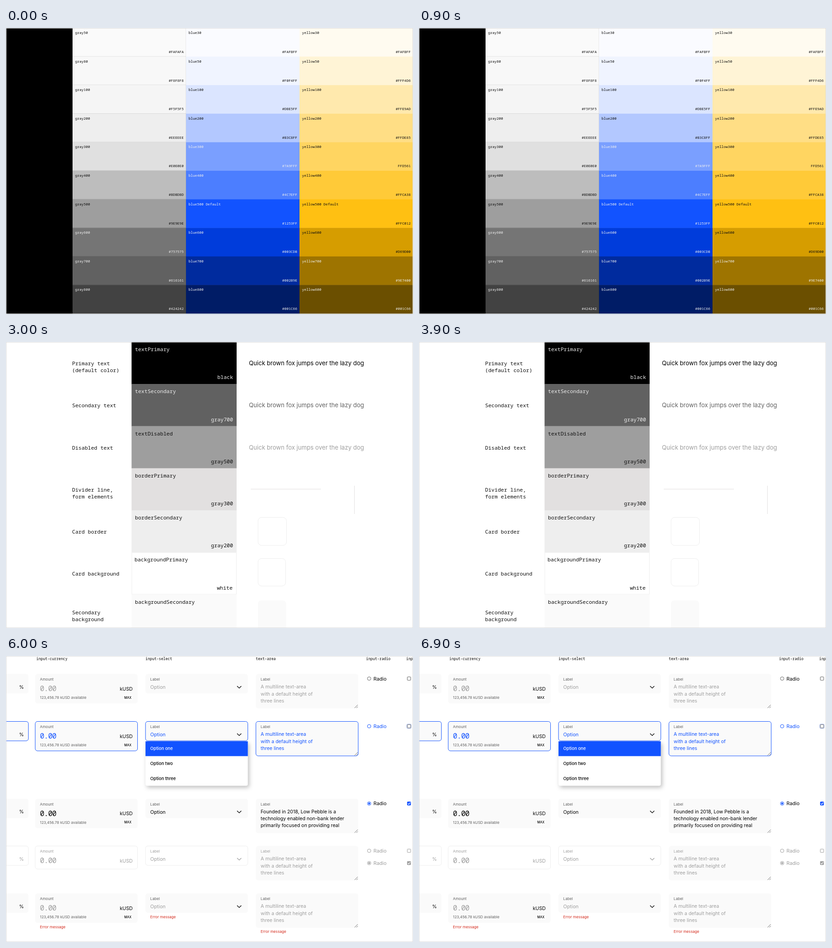
Write an HTML page that moves like this. It is 893x627 px and loops after 7.5 s.

```html
<!DOCTYPE html>
<html lang="en">
<head>
<meta charset="utf-8">
<title>Colour system</title>
<style>
html, body { margin: 0; width: 100%; height: 100%; overflow: hidden; }
svg { display: block; width: 893px; height: 627px; }
text { font-family: Inter, sans-serif; white-space: pre; }
.mono { font-family: "Noto Sans Mono", "DejaVu Sans Mono", monospace; }
</style>
</head>
<body>
<svg id="stage" viewBox="0 0 893 627"></svg>
<script>
const SLIDE_MS = 1500;
const BLUE = '#1253FF';

const rect = (x, y, w, h, fill, attrs = '') =>
  `<rect x="${x}" y="${y}" width="${w}" height="${h}" fill="${fill}" ${attrs}/>`;
const box = (x, y, w, h, r, fill, stroke = 'none') =>
  rect(x, y, w, h, fill, `rx="${r}" stroke="${stroke}"`);
const path = (d, stroke, width = 1) =>
  `<path d="${d}" fill="none" stroke="${stroke}" stroke-width="${width}"/>`;
const text = (x, y, size, fill, str, attrs = '') =>
  `<text x="${x}" y="${y}" font-size="${size}" fill="${fill}" ${attrs}>${str}</text>`;
const mono = (x, y, size, fill, str, attrs = '') =>
  text(x, y, size, fill, str, `class="mono" ${attrs}`);
const END = 'text-anchor="end"';

// Palette: [name, shades, swatch colours, first row with light text, label overrides]
const palette = [
  ['gray', '50 80 100 200 300 400 500 600 700 800',
    'FAFAFA F8F8F8 F5F5F5 EEEEEE E0E0E0 BDBDBD 9E9E9E 757575 616161 424242', 7, {}],
  ['blue', '30 50 100 200 300 400 500 600 700 800',
    'FAFBFF F0F4FF DBE5FF B3C8FF 7A9FFF 4C7EFF 1253FF 003CDB 002B9E 001C66', 4, {}],
  ['yellow', '30 50 100 200 300 400 500 600 700 800',
    'FFFBF0 FFF4D6 FFE9AD FFDE85 FFD561 FFCA38 FFC012 D69D00 9E7400 6B4F00', 8,
    { 0: '#FAFBFF', 4: 'FFD561', 9: '#001C66' }],
];

function paletteSlide() {
  const rowH = 62.6;
  let out = rect(0, 0, 146, 627, '#000');
  palette.forEach(([name, shades, colours, lightFrom, labels], c) => {
    const x = 146 + c * 249;
    const hexes = colours.split(' ');
    shades.split(' ').forEach((shade, r) => {
      const y = r * rowH;
      const ink = r < lightFrom ? '#111' : '#eee';
      const suffix = c && shade === '500' ? ' Default' : '';
      out += rect(x, y, 249, rowH + 0.5, '#' + hexes[r]);
      if (!c) out += path(`M${x} ${y + rowH - 0.3}h249v${-rowH}`, 'rgba(0,0,0,.13)');
      out += mono(x + 5.5, y + 13, 7.85, ink, name + shade + suffix);
      out += mono(x + 244, y + 55, 7.85, ink, labels[r] || '#' + hexes[r], END);
    });
  });
  return out;
}

const roles = [
  ['textPrimary', 'Primary text', '(default color)'],
  ['textSecondary', 'Secondary text'],
  ['textDisabled', 'Disabled text'],
  ['borderPrimary', 'Divider line,', 'form elements'],
  ['borderSecondary', 'Card border'],
  ['backgroundPrimary', 'Card background'],
  ['backgroundSecondary', 'Secondary', 'background'],
];

function rolesSlide(t) {
  const rowH = 92.25;
  let out = rect(0, 0, 893, 627, t.page);
  roles.forEach(([role, ...notes], i) => {
    const y = i * rowH;
    const nudge = i === 5 ? t.nudge : 0;
    const ink = t.inks[i];
    notes.forEach((note, n) =>
      out += mono(t.noteX, y + (i === 6 ? 43.5 : 51) + n * 15, 11.53, t.ink, note));
    out += rect(t.x, y, 230.5, rowH + 0.3, t.fills[i]);
    if (i === 5) out += box(t.x + 0.5, y + 0.5, 229.5, rowH - 1, 0, t.page, t.fills[4]);
    out += mono(t.x + 7.5 - nudge, y + 20, 11.53, ink, role);
    if (t.values[i]) out += mono(t.x + 222.7 - nudge, y + 81.3, 11.53, ink, t.values[i], END);
    if (i < 3) {
      out += text(t.sampleX, y + 51, 13.1, t.fills[i], 'Quick brown fox jumps over the lazy dog');
    }
  });
  const [line, card] = [t.fills[3], t.fills[4]];
  out += path(`M${t.lineX} 322.5h154M${t.barX} 315v62`, line);
  out += box(t.cardX + 0.5, 384.5, t.cardW, 61.5, 8, 'none', card);
  out += box(t.cardX + 0.5, 474.5, 60.5, 60.5, 8, t.page, card);
  return out + box(t.cardX + 0.5, 566.5, 61.5, 70, 7, t.fills[6]);
}

const darkRoles = {
  page: '#000', ink: '#eee', x: 277.7, noteX: 147, sampleX: 539, nudge: 0,
  lineX: 539, barX: 769.5, cardX: 538.5, cardW: 61.5,
  fills: ['#fff', '#9E9E9E', '#757575', '#616161', '#424242', '#000', '#212121'],
  inks: ['#111', '#111', '#111', '#eee', '#eee', '#eee', '#eee'],
  values: ['white', 'gray500', 'gray600', 'gray700', 'gray800', 'black'],
};
const lightRoles = {
  page: '#fff', ink: '#111', x: 275.5, noteX: 145, sampleX: 533, nudge: 1,
  lineX: 537, barX: 764.5, cardX: 552.5, cardW: 62.5,
  fills: ['#000', '#616161', '#9E9E9E', '#E2E0E0', '#EEEEEE', '#fff', '#FAFAFA'],
  inks: ['#eee', '#eee', '#111', '#111', '#111', '#111', '#111'],
  values: ['black', 'gray700', 'gray500', 'gray300', 'gray200', 'white'],
};

const rowTops = [39, 143, 312.5, 416, 520];
const FOCUS = 1, FILLED = 2, DISABLED = 3, ERROR = 4;
const sampleLines = ['A multiline text-area', 'with a default height of', 'three lines'];

function radio(t, x, y, colour, ink, on) {
  return `<circle cx="${x}" cy="${y}" r="3.8" fill="none" stroke="${colour}"/>` +
    (on ? `<circle cx="${x}" cy="${y}" r="2.1" fill="${colour}"/>` : '') +
    text(x + 9.5, y + 4, 10.8, ink, 'Radio');
}

function checkbox(t, y, colour, on) {
  const x = t.checkX;
  return box(x - 3.7, y - 3.7, 7.4, 7.4, 1, on ? colour : 'none', colour) +
    (on ? path(`M${x - 2.5} ${y}l2 2 3.2-4`, t.page, 1.2) : '');
}

function formsSlide(t) {
  const [cx, sx, ax] = t.cols;
  let out = rect(0, 0, 893, 627, t.page);
  ['input-currency', 'input-select', 'text-area', 'input-radio', 'input-checkbox'].forEach((h, i) =>
    out += mono(t.heads[i], 9, 8.15, t.ink, h, 'font-weight="500"'));

  rowTops.forEach((y, row) => {
    const off = row === DISABLED;
    const stroke = row === FOCUS ? t.focus : off ? t.outline : 'none';
    const value = [t.hint, t.value, t.ink, t.off, t.hint][row];
    const label = off ? t.offLabel : t.label;
    const strong = off ? t.off : t.ink;
    const panel = (x, w, h, fill = off ? t.page : t.panel, line = stroke) =>
      box(x + 0.5, y + 0.5, w - 1, h - 1, 5, fill, line);
    const small = (x, dy, colour, str) => text(x, y + dy, 8.15, colour, str);

    out += panel(-20, t.percentW + 20, 43.5);
    out += text(t.percentX, y + 32.5, 10.6, strong, '%', 'text-anchor="middle"');

    out += panel(cx, 225.5, off ? 51.5 : 65.5);
    out += small(cx + 11, 15, label, 'Amount');
    out += mono(cx + 11, y + 38.2, 16, value, '0.00', 'letter-spacing="-.7"');
    out += text(cx + 214.3, y + 36.5, 10.6, strong, 'kUSD', END);
    if (!off) {
      out += small(cx + 11, 55.2, label, '123,456.78 kUSD available');
      out += box(cx + 193.5, y + 46, 20.5, 12, 3, t.page);
      out += text(cx + 203.8, y + 54.6, 6.9, t.ink, 'MAX', 'text-anchor="middle" font-weight="500"');
    }

    out += panel(sx, 225.5, 43.5);
    out += small(sx + 11, 15, label, 'Label');
    out += text(sx + 11, y + 33, 10.7, value, 'Option');
    out += path(`M${sx + 201.5} ${y + 27}l4.6 4.4 4.6-4.4`, strong, 1.3);

    const lines = row === FILLED ? t.filledLines : sampleLines;
    const areaInk = row === ERROR ? t.errorArea : value;
    if (off && t.solidArea) out += panel(ax, 225.5, 76.5, t.panel, 'none');
    else out += panel(ax, 225.5, 76.5);
    out += small(ax + 11, 15, label, 'Label');
    lines.forEach((line, i) =>
      out += text(ax + 11, y + 32.4 + i * 15.1, 10.5, areaInk, line));
    out += path(`M${ax + 217} ${y + 75}l7-7M${ax + 221} ${y + 75}l3-3`, t.label, 0.9);

    if (row === ERROR) {
      [[cx, 76.5], [sx, 55], [ax, t.areaErrorY]].forEach(([x, dy]) =>
        out += small(x + 11, dy, t.error, 'Error message'));
    }
  });

  const menu = rect(sx + 0.5, 187, 224.5, 97.5, t.page, `rx="4" style="filter:drop-shadow(${t.shadow})"`);
  out += menu + rect(sx + 0.5, 187, 224.5, 32.5, BLUE);
  ['one', 'two', 'three'].forEach((n, i) =>
    out += text(sx + 11, 206.4 + i * 32.7, 9.45, i ? t.ink : t.page, 'Option ' + n, 'font-weight="500"'));

  const rx = t.radioX;
  out += radio(t, rx + t.radioShift, 49.5, t.label, t.ink);
  out += radio(t, rx, 154, t.focus, t.value);
  out += radio(t, rx, t.checkedY, BLUE, t.ink, true);
  out += radio(t, rx, 427, t.off, t.off) + radio(t, rx, 454, t.off, t.off, true);

  out += box(t.checkX - 4.8, 149.2, 9.6, 9.6, 2, 'none', t.ring);
  out += checkbox(t, 49.5, t.label) + checkbox(t, 154, t.checkFocus);
  out += checkbox(t, t.checkedY, BLUE, true);
  return out + checkbox(t, 427, t.off) + checkbox(t, 454, t.off, true);
}

const darkForms = {
  page: '#000', panel: '#181818', ink: '#fff', hint: '#6b6b6b', label: '#9E9E9E',
  off: '#6b6b6b', offLabel: '#8a8a8a', outline: '#2c2c2c', focus: BLUE, value: '#4C7EFF',
  error: '#E0402A', errorArea: '#fff', areaErrorY: 87.5, solidArea: false,
  cols: [65, 309.3, 553.7], heads: [65, 307, 551, 796, 879],
  percentW: 48.5, percentX: 33, radioX: 802, radioShift: 3, checkX: 885.3, checkedY: 313.7,
  ring: '#0d349c', checkFocus: '#4C7EFF', filledLines: sampleLines,
  shadow: '3px 4px 4px rgba(255,255,255,.5)',
};
const lightForms = {
  page: '#fff', panel: '#FAFAFA', ink: '#000', hint: '#9E9E9E', label: '#616161',
  off: '#9E9E9E', offLabel: '#9E9E9E', outline: '#EEEEEE', focus: BLUE, value: BLUE,
  error: '#D3281A', errorArea: '#9E9E9E', areaErrorY: 86.5, solidArea: true,
  cols: [63.6, 305.6, 547.8], heads: [66.5, 306, 548, 790, 878],
  percentW: 49.7, percentX: 34, radioX: 796.8, radioShift: 0, checkX: 884.2, checkedY: 323.4,
  ring: '#a9bdf5', checkFocus: '#616161',
  filledLines: ['Founded in 2018, Low Pebble is a', 'technology enabled non-bank lender',
    'primarily focused on providing real'],
  shadow: '3px 4px 5px rgba(0,0,0,.25)',
};

const frame = rect(0.5, 0.5, 892, 626, 'none', 'stroke="#ddd"');
const slides = [paletteSlide(), rolesSlide(darkRoles), rolesSlide(lightRoles),
  formsSlide(darkForms), formsSlide(lightForms)];
const stage = document.getElementById('stage');
stage.innerHTML = slides.map(s => `<g>${s}</g>`).join('') + frame;
const groups = [...stage.children].slice(0, slides.length);

function draw() {
  const current = Math.floor(performance.now() / SLIDE_MS) % slides.length;
  groups.forEach((g, i) => g.style.display = i === current ? '' : 'none');
  requestAnimationFrame(draw);
}
draw();
</script>
</body>
</html>
```
